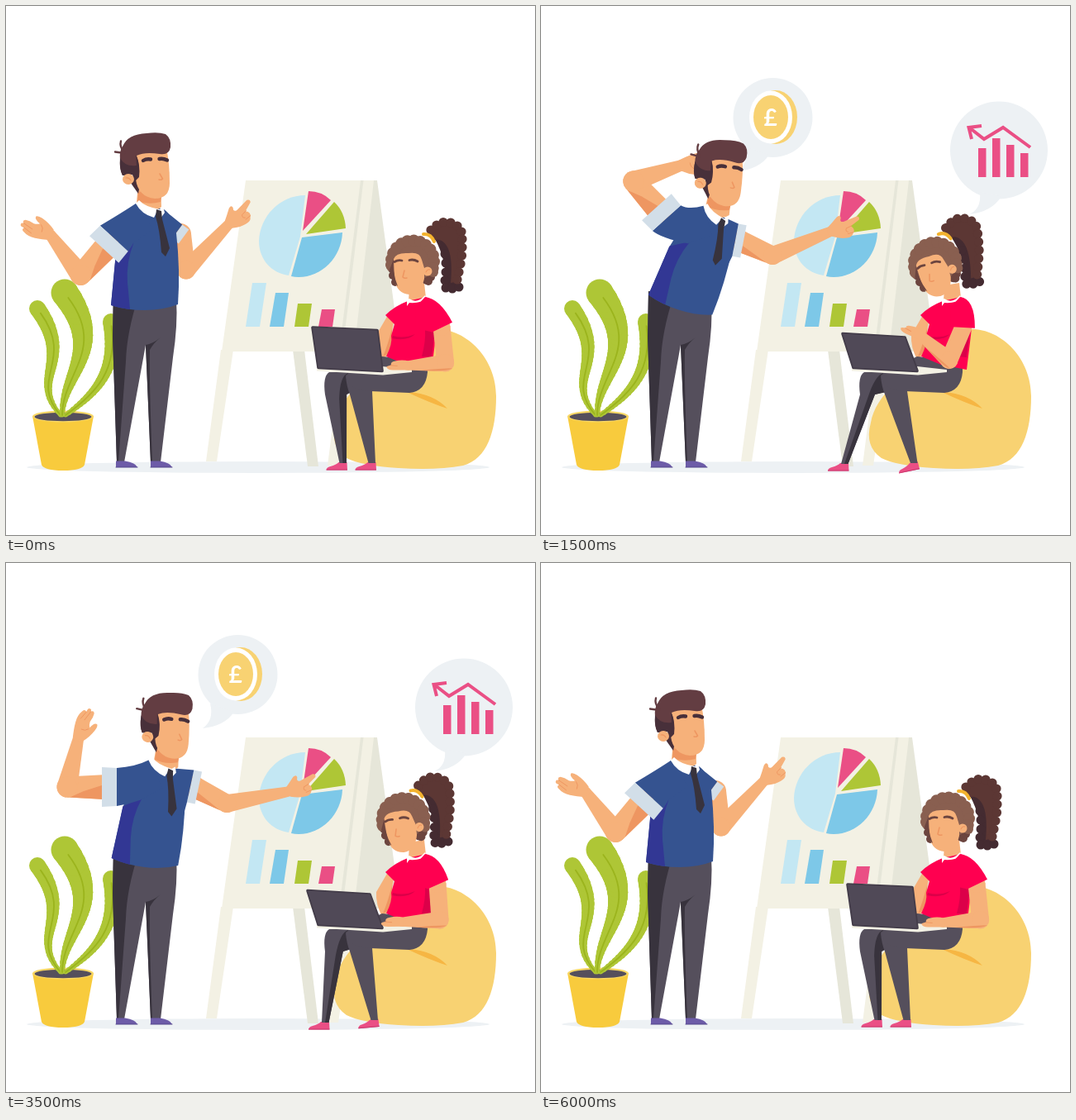
An HTML page with a canvas that plays this animation: 640 by 640 pixels, repeating every 6.07 s.

```html
<!DOCTYPE html>
<html lang="en">
<head>
<meta charset="utf-8">
<title>Presentation</title>
<style>
html, body { margin: 0; width: 100%; height: 100%; overflow: hidden; background: #fff; }
canvas { display: block; width: 640px; height: 640px; }
</style>
</head>
<body>
<canvas id="stage" width="640" height="640"></canvas>
<script>
const ctx = document.getElementById('stage').getContext('2d');
const LOOP = 6070;
const TIMES = [0, 570, 1500, 2210, 3500, 4500, 5250];

const SKIN = '#f6b17a', SKIN_SHADE = '#ee9661';
const SHIRT = '#355390', SHIRT_SHADE = '#323794', CUFF = '#d2dee8';
const GREY = '#554f5c', DARK = '#38333d';
const HAIR = '#633d42', HAIR_DARK = '#48303a';
const CURLS = '#895f50', CURLS_DARK = '#6c453f', PONY = '#5c3734', PONY_DARK = '#442b31';
const RED = '#ff0050', RED_SHADE = '#dc0049';
const CREAM = '#f3f1e4', CREAM_DARK = '#e6e6d9', MIST = '#edf1f4';
const PINK = '#ea4f85', GREEN = '#aec636', SKY = '#7dc8e8', PALE = '#c3e7f3';
const GOLD = '#f8d272', WHITE = '#fff';

// One value per pose; the first pose closes the loop.
const MAN = {
  lean: [0, 10, 18, 2, 7, 11],
  headX: [0, 23.5, 41, 8, 21, 33],
  headY: [0, 3, 8, 2, 3, 6],
  headTilt: [0, 1, 8, 1, 5, 8],
  backX: [143, 156, 164, 143, 152, 159],
  backY: [268, 267, 270, 273, 271, 265],
  backUpper: [132.5, 184.6, 228, 213.7, 180, 137.5],
  backFore: [233, 288, 341.6, 322.4, 283, 228],
  backHand: [196, 276, 345, 325, 289, 206],
  frontX: [211, 228, 240, 217, 228, 228],
  frontY: [276, 283, 284, 270, 271, 283],
  frontUpper: [81, 46, 24, 29, 27, 83],
  frontFore: [313, 316.5, 337.5, 327.5, 349, 355],
  frontHand: [313, 280, 336, 299, 329, 360]
};
const WOMAN = {
  headX: [0, -4, -6, -6, -7, -1],
  headTilt: [0, -5, -15, -17, -7, 0],
  pony: [0, -1, -6, -8, -2, 4],
  armX: [527, 511, 511, 522, 522, 511],
  upper: [84, 113, 113, 86, 86, 113],
  fore: [176, 221, 221, 177, 177, 221],
  hand: [178, 202, 202, 178, 178, 202],
  lid: [0, 0, 1, 1, 1, 0],
  farX: [407.5, 387, 367, 369, 386, 402.5],
  farY: [553, 556, 554, 554, 556, 554],
  nearX: [442.5, 446.5, 451, 451, 445.5, 443.5],
  shoe: [0, -5, -12, -12, -5, -1]
};

// Cubic interpolation that never overshoots a pose.
function valueAt(row, t) {
  const v = [...row, row[0]], last = TIMES.length - 1;
  if (t >= TIMES[last]) return v[last];
  const slope = i => (v[i + 1] - v[i]) / (TIMES[i + 1] - TIMES[i]);
  const tangent = i => {
    if (i === 0 || i === last) return 0;
    const a = slope(i - 1), b = slope(i);
    return a * b > 0 ? 2 * a * b / (a + b) : 0;
  };
  let i = 0;
  while (t >= TIMES[i + 1]) i++;
  const h = TIMES[i + 1] - TIMES[i], s = (t - TIMES[i]) / h, r = 1 - s;
  return v[i] * (1 + 2 * s) * r * r + v[i + 1] * s * s * (3 - 2 * s)
    + h * s * r * (tangent(i) * r - tangent(i + 1) * s);
}

function poseAt(table, t) {
  const pose = {};
  for (const key in table) pose[key] = valueAt(table[key], t);
  return pose;
}

const rad = deg => deg * Math.PI / 180;
const step = (p, deg, d, side = 0) => {
  const c = Math.cos(rad(deg)), s = Math.sin(rad(deg));
  return [p[0] + c * d - s * side, p[1] + s * d + c * side];
};

function fill(color, d) {
  ctx.fillStyle = color;
  ctx.fill(new Path2D(d));
}
function line(color, width, d) {
  ctx.strokeStyle = color;
  ctx.lineWidth = width;
  ctx.lineCap = ctx.lineJoin = 'round';
  ctx.stroke(new Path2D(d));
}
function oval(color, x, y, rx, ry = rx) {
  ctx.fillStyle = color;
  ctx.beginPath();
  ctx.ellipse(x, y, rx, ry, 0, 0, Math.PI * 2);
  ctx.fill();
}
const poly = (color, ...pts) => fill(color, 'M' + pts.join('L') + 'Z');

// Tapered capsule between two circles.
function limb(color, a, ra, b, rb) {
  const deg = Math.atan2(b[1] - a[1], b[0] - a[0]) * 180 / Math.PI;
  poly(color, step(a, deg, 0, ra), step(b, deg, 0, rb), step(b, deg, 0, -rb), step(a, deg, 0, -ra));
  oval(color, a[0], a[1], ra);
  oval(color, b[0], b[1], rb);
}
function placed(x, y, deg, draw) {
  ctx.save();
  ctx.translate(x, y);
  ctx.rotate(rad(deg));
  draw();
  ctx.restore();
}
const pivoted = (x, y, dx, dy, deg, draw) => placed(x + dx, y + dy, deg, () => {
  ctx.translate(-x, -y);
  draw();
});

function drawEasel() {
  fill(CREAM_DARK, 'M347 416L361 416L378 557L365 557Z');
  fill(CREAM, 'M260 416L275 416L255 551L242 551Z M407 416L422 416L402 556L389 556Z');
  fill(CREAM_DARK, 'M444 211L449 211L477 418L419 418Z');
  fill(CREAM, 'M290 211L445 211L421 418L261 418Z');
  fill(CREAM_DARK, 'M429 211L432.5 211L407 418L403 418Z');
  fill(PALE, 'M362 229C331 229 307 255 306 284C306 307 321 323 342 326L356 279Z');
  fill(SKY, 'M358 280L407 274C406 304 382 328 354 328Q349 328 345 327Z');
  fill(PINK, 'M366 224Q382 224 393 235L359 272Z');
  fill(GREEN, 'M397 237Q410 249 411 269L363 276Z');
  fill(PALE, 'M298 335L315 335L307 388L290 388Z');
  fill(SKY, 'M326 347L342 347L336 388L319 388Z');
  fill(GREEN, 'M353 360L370 360L366 388L349 388Z');
  fill(PINK, 'M382 367L398 367L395 388L378 388Z');
}

function leaf(p, wide) {
  const at = u => [0, 1].map(k => {
    const r = 1 - u;
    return r * r * r * p[0][k] + 3 * r * r * u * p[1][k] + 3 * r * u * u * p[2][k] + u * u * u * p[3][k];
  });
  const size = u => 2.5 + (wide - 2.5) * u;
  for (let i = 0; i < 24; i++) limb(GREEN, at(i / 24), size(i / 24), at((i + 1) / 24), size((i + 1) / 24));
  line('#9bb41d', 1.8, `M${p[0]}C${p[1]} ${p[2]} ${at(0.97)}`);
}

function drawPlant() {
  fill('#f8cb3d', 'M32 496L43 555Q46 562 69 562Q92 562 95 555L106 496Z');
  oval('#f8d765', 69, 496.5, 37, 7);
  oval(GREY, 69, 497, 34.5, 5.2);
  leaf([[72, 495], [110, 468], [135, 440], [127, 382]], 10);
  leaf([[66, 495], [26, 450], [84, 430], [38, 366]], 10);
  leaf([[68, 495], [68, 445], [122, 415], [71, 347]], 16.5);
}

function bubble(tipX, tipY, scale, draw) {
  if (scale <= 0) return;
  ctx.save();
  ctx.translate(tipX, tipY);
  ctx.scale(scale, scale);
  ctx.translate(-tipX, -tipY);
  draw();
  ctx.restore();
}
function drawCoin() {
  oval(MIST, 280.5, 135, 48);
  fill(MIST, 'M247 170Q252 190 238 200Q265 197 276 180Z');
  oval(GOLD, 284, 134.5, 26, 32.5);
  oval(WHITE, 278, 134.5, 26, 32);
  oval(GOLD, 278, 134.5, 21, 26.5);
  ctx.fillStyle = WHITE;
  ctx.font = '700 28px Lato, sans-serif';
  ctx.textAlign = 'center';
  ctx.fillText('£', 277.5, 144.5);
}
function drawGrowth() {
  oval(MIST, 554, 174.5, 59);
  fill(MIST, 'M531 225Q533 246 518 252Q546 249 557 230Z');
  [[529, 172], [546, 160], [563, 168], [580, 178]].forEach(([x, y]) =>
    fill(PINK, `M${x} ${y}h9.5V207h-9.5Z`));
  ctx.lineCap = 'butt';
  ctx.strokeStyle = PINK;
  ctx.lineWidth = 4;
  ctx.lineJoin = 'miter';
  ctx.stroke(new Path2D('M518 147L536 161L559 147L592 171M533 145L517.5 147L521 161'));
}

function openHand() {
  fill(SKIN, 'M-3-6.5Q8-9 16-9.500Q25-10 31-6Q35-4 32-1Q38-1 37 2.500Q37 4 34 4Q37 7 33 8.500Q28 9 22 7Q18 7 15 9Q23 12 22 16Q20 18 14 16Q5 13 -3 6.500Z');
  line(SKIN_SHADE, 0.9, 'M22-5L32-1M22 0L34 4M13 8Q9 5 10 0');
}
function pointHand() {
  fill(SKIN, 'M-3-6Q4-9 12-13Q17-14 16-10Q12-6 17-4.500L34-4Q38-2 35 1L23 4Q27 10 22 13Q19 17 13 15Q5 13 -3 6Z');
  line(SKIN_SHADE, 0.9, 'M24 4L17 4Q14 7 17 9M23 12L16 11');
}

function drawTrousers() {
  fill(GREY, 'M130 345L206 355Q208 385 202 425L187 552L175 552L169 410L143 552L134 552L129 400Z');
  fill(DARK, 'M130 345L160 352Q146 395 145 430L136 552L134 552L129 400Z');
  fill(DARK, 'M169 410Q177 409 187 401Q179 407 174 416Q173 450 177 552L175 552Z');
  [133, 175].forEach(x => {
    fill('#6d5ca8', `M${x} 558v-7.500h11q13 2 15 7.500Z`);
    line('#53468b', 1, `M${x} 558h26`);
  });
}

function drawManHead() {
  fill(HAIR_DARK, 'M146 207L160 227L164 207Z');
  fill(SKIN, 'M154 172L194 172Q198 190 198 214Q198 233 180 233Q160 231 157 210Z');
  fill(HAIR, 'M138 186Q137 175 141 170Q147 155 170 154Q184 152 193 155Q200 160 199 171Q197 181 186 179Q168 176 158 181Q163 193 160 207L155 213L154 204L141 205Q137 198 138 186Z');
  fill(HAIR_DARK, 'M138 184Q144 195 158 193L157 180Q163 193 161 207L155 213L153 204L141 205Q137 196 138 184Z');
  oval(SKIN, 148, 209.5, 7, 6.5);
  line(SKIN_SHADE, 1.2, 'M145 208Q149 207 151 211');
  line(HAIR, 2.4, 'M139 163.500Q137 170 143 177M132 176.500L143 178');
  line(HAIR_DARK, 4.4, 'M166 187Q170 184.500 175 185.500M185.500 185Q190 184 195 186.500');
  line(SKIN_SHADE, 1.5, 'M186 203L189.500 209Q188 211 185 210');
}

function drawMan(m) {
  const hip = [168, 365];
  const onTorso = (x, y) => step(hip, m.lean, x - hip[0], y - hip[1]);
  const torso = draw => pivoted(...hip, 0, 0, m.lean, draw);
  const head = draw => pivoted(173, 235, m.headX, m.headY, m.headTilt, draw);

  drawTrousers();

  const front = [m.frontX, m.frontY];
  const frontElbow = step(front, m.frontUpper, 44);
  const frontWrist = step(frontElbow, m.frontFore, 78);
  limb(SKIN, front, 13, frontElbow, 11);
  poly(SKIN_SHADE, step(front, m.frontUpper, 6, 13), step(frontElbow, m.frontUpper, -4, 11), step(front, m.frontUpper, 6, 4));
  limb(SKIN, frontElbow, 11, frontWrist, 6);
  placed(...frontWrist, m.frontHand, pointHand);

  const back = [m.backX, m.backY], dir = m.backUpper;
  const backElbow = step(back, dir, 78);
  const backWrist = step(backElbow, m.backFore, 62);
  limb(SKIN, step(back, dir, 30), 15, backElbow, 12.5);
  poly(SKIN_SHADE, step(back, dir, 34, -15), step(backElbow, dir, -3, -12.5), step(back, dir, 58, -5), step(back, dir, 36, 2));
  limb(SKIN, backElbow, 12.5, backWrist, 6.5);
  placed(...backWrist, m.backHand, openHand);

  const cuffDir = m.frontUpper * 0.45;
  const half = (40 - Math.max(0, m.frontUpper - 28) * 0.36) / 2;
  const inTop = step(front, cuffDir, -5, -half), inLow = step(front, cuffDir, -5, half);
  poly(CUFF, inTop, step(front, cuffDir, 5, -half), step(front, cuffDir, 5, half), inLow);

  torso(() => {
    fill(SHIRT, 'M157 239L191 246Q202 253 206 275Q211 320 208 361Q190 368 168 368Q145 368 127 362L133 300L142 262Z');
    fill(SHIRT_SHADE, 'M133 298L155 285Q145 310 147 335L150 367Q136 365 127 362Z');
  });
  poly(SHIRT, onTorso(189, 245), inTop, inLow, onTorso(207, 300), onTorso(190, 300));

  const top = step(back, dir, 18, 23), low = step(back, dir, 18, -23);
  const neck = onTorso(157, 239), mid = onTorso(142, 249), pit = onTorso(153, 288);
  fill(SHIRT, `M${neck}Q${mid} ${top}L${low}Q${step(low, dir, -14, 2)} ${pit}L${onTorso(178, 270)}Z`);
  poly(CUFF, top, step(back, dir, 36, 24), step(back, dir, 36, -24), low);

  head(() => {
    fill(SKIN, 'M160 215L187 215L188 243Q176 254 158 238Z');
    fill(SKIN_SHADE, 'M160 224L188 231L187 237Q172 241 159 236Z');
  });
  torso(() => {
    fill(WHITE, 'M157 239L161 235Q168 243 186 246L190 243L192 250L187 257L183 248L179 256Q164 252 157 239Z');
    fill(DARK, 'M182 246L188 248L189 258L198 293L193 303L188 298Q186 270 181 255Z');
  });
  head(drawManHead);
}

function drawBag() {
  fill(GOLD, 'M515 391C556 388 593 426 593 472C593 515 582 548 553 556Q520 562 475 559Q430 556 412 547Q391 533 399 504C405 470 440 445 468 425Z');
}

function drawShoe(x, y, deg) {
  placed(x, y, deg, () => {
    fill(PINK, 'M5-1L-5-1Q-8 2-15 4Q-20 5-20 8.500L5.500 8.500Z');
    line('#c8366c', 1, 'M-19.500 8L5 8');
  });
}

const bumps = (color, r, pts) => pts.forEach(([x, y]) => oval(color, x, y, r));

function drawPony() {
  fill(PONY_DARK, 'M518 280L537 284Q550 312 547 342L531 342Q535 310 518 280Z');
  bumps(PONY_DARK, 5.5, [[531, 300], [532, 311], [532, 322], [531, 332], [532, 341], [540, 342], [548, 340]]);
  fill(PONY, 'M511 277Q516 261 530 260Q549 262 553 282L552 306L548 333L538 335Q541 302 533 290Q526 280 518 284Z');
  bumps(PONY, 5.6, [[514, 271], [521, 265], [529, 261.5], [538, 262], [546, 266], [551, 273],
    [552, 282], [552, 292], [551.5, 302], [550, 312], [548, 322], [546, 331]]);
}

function drawWomanHead(w) {
  pivoted(515, 280, 0, 0, w.pony - w.headTilt, drawPony);
  line('#f3b32e', 4, 'M505 276Q514 275 518 285');
  oval(CURLS_DARK, 509, 327, 8, 10);
  bumps(CURLS_DARK, 5, [[514, 328], [511, 333], [467, 318], [468, 326], [471, 334]]);
  oval(CURLS, 492, 308, 27, 25);
  for (let a = 168; a <= 378; a += 17.5) {
    const p = [492 + 26 * Math.cos(rad(a)), 309 + 25.5 * Math.sin(rad(a))];
    oval(CURLS, p[0], p[1], 7);
  }
  bumps(CURLS, 6, [[517, 322], [465, 313]]);
  fill(SKIN, 'M469 306Q472 298 487 299Q501 297 503 307L506 317L506 330Q502 348 488 349Q473 348 470 331Z');
  fill(CURLS_DARK, 'M469 306Q467 322 474 339Q466 334 464 319Z');
  oval(SKIN, 510, 321, 5.5);
  line(SKIN_SHADE, 1.1, 'M508 322Q510 318 513 319');
  line(CURLS_DARK, 2.8, 'M470 309.500Q474 307 479 308M488 307.500Q493 306 498 309');
  line(SKIN_SHADE, 1.5, 'M482 320L480 328Q482 330 485 329');
}

function drawWoman(w) {
  const far = [w.farX, w.farY], near = w.nearX;
  fill(SKIN, 'M462 374L469 382Q465 402 468 418L455 428Q447 412 448 398Z');
  fill(SKIN_SHADE, 'M467 390L468 418L456 424Q462 410 467 390Z');

  drawShoe(...far, 0);
  const calf = 412 + (far[0] - 407) * 0.2;
  fill(GREY, `M391 443Q383 448 386 470L${far[0] - 4} ${far[1]}h8.500L${calf} 470L416 467L416 443Z`);
  fill(DARK, `M414 444Q404 447 ${calf - 9} 475L${far[0]} ${far[1]}h4.500L${calf} 470L418 467Z`);

  drawShoe(near, 553, w.shoe);
  fill('#f6b643', 'M487 467Q517 469 534 487Q515 481 487 468Z');
  fill(GREY, `M411 448Q412 460 416 470L${near - 4} 553h8.500L443 466Z`);
  fill(GREY, 'M455 424L510 430L510 443Q508 466 488 468L440 466Q414 465 411 447Q420 440 455 424Z');

  fill(SKIN, 'M488 338L506 335L508 353Q498 367 487 358Z');
  fill(RED, 'M486 357L508 352Q520 358 522 380Q520 400 515 440L484 434L460 424Q468 408 466 399L470 385L459 374Q470 363 486 357Z');
  fill(RED_SHADE, 'M468 399Q481 403 495 397Q485 406 467 402Z');
  fill(RED_SHADE, 'M507 392L520 385L515 425L503 424Q508 405 507 392Z');
  fill(WHITE, 'M485 356L488 354Q497 361 507 350L509 354Q502 360 488 359L485 363Z');

  pivoted(496, 345, w.headX, 0, w.headTilt, () => drawWomanHead(w));

  fill(CREAM, 'M376 438L455 436L491 440L491 443L456 446.500L376 441.500Z');
  const lid = w.lid;
  const screen = `M${371 - 6 * lid} ${389 + 7.5 * lid}L${449 - 9 * lid} ${392.5 + 8.5 * lid}L455 441.500L378 437.500Z`;
  line('#433c49', 3.6, screen);
  fill('#504957', screen);

  const shoulder = [w.armX, 388];
  const elbow = step(shoulder, w.upper, 44);
  const wrist = step(elbow, w.fore, 46.5);
  limb(SKIN, shoulder, 10.5, elbow, 10.5);
  limb(SKIN, elbow, 10.5, wrist, 5.5);
  fill(SKIN_SHADE, `M${step(elbow, w.fore, -8, -7)}Q${step(elbow, w.fore, 0, -11)} ${step(elbow, w.fore, 30, -7)}Q${step(elbow, w.fore, 6, -6)} ${step(elbow, w.fore, -8, -7)}Z`);
  placed(...wrist, w.hand, () => {
    fill(SKIN, 'M-3-5.500L16-5Q24-5 25-1Q24 1 19 1Q21 5 14 6Q5 8-3 5Z');
    line(SKIN_SHADE, 0.9, 'M12 0L20 1');
  });
  const cut = w.upper - 20;
  const outer = step(shoulder, cut, 1, -14), inner = step(shoulder, cut, 1, 13);
  fill(RED, `M507 352Q525 354 ${outer}L${inner}L496 390L495 365Z`);
}

function ease(t, from, to) {
  const s = Math.min(1, Math.max(0, (t - from) / (to - from)));
  return s * s * (3 - 2 * s);
}

function draw(t) {
  ctx.clearRect(0, 0, 640, 640);
  oval(MIST, 305, 558, 280, 7);
  drawEasel();
  drawPlant();
  bubble(238, 200, ease(t, 1050, 1450) - ease(t, 5050, 5450), drawCoin);
  bubble(518, 252, ease(t, 750, 1150) - ease(t, 4800, 5150), drawGrowth);
  drawBag();
  drawMan(poseAt(MAN, t));
  drawWoman(poseAt(WOMAN, t));
}

const start = performance.now();
function tick() {
  draw((performance.now() - start) % LOOP);
  requestAnimationFrame(tick);
}
tick();
</script>
</body>
</html>
```
